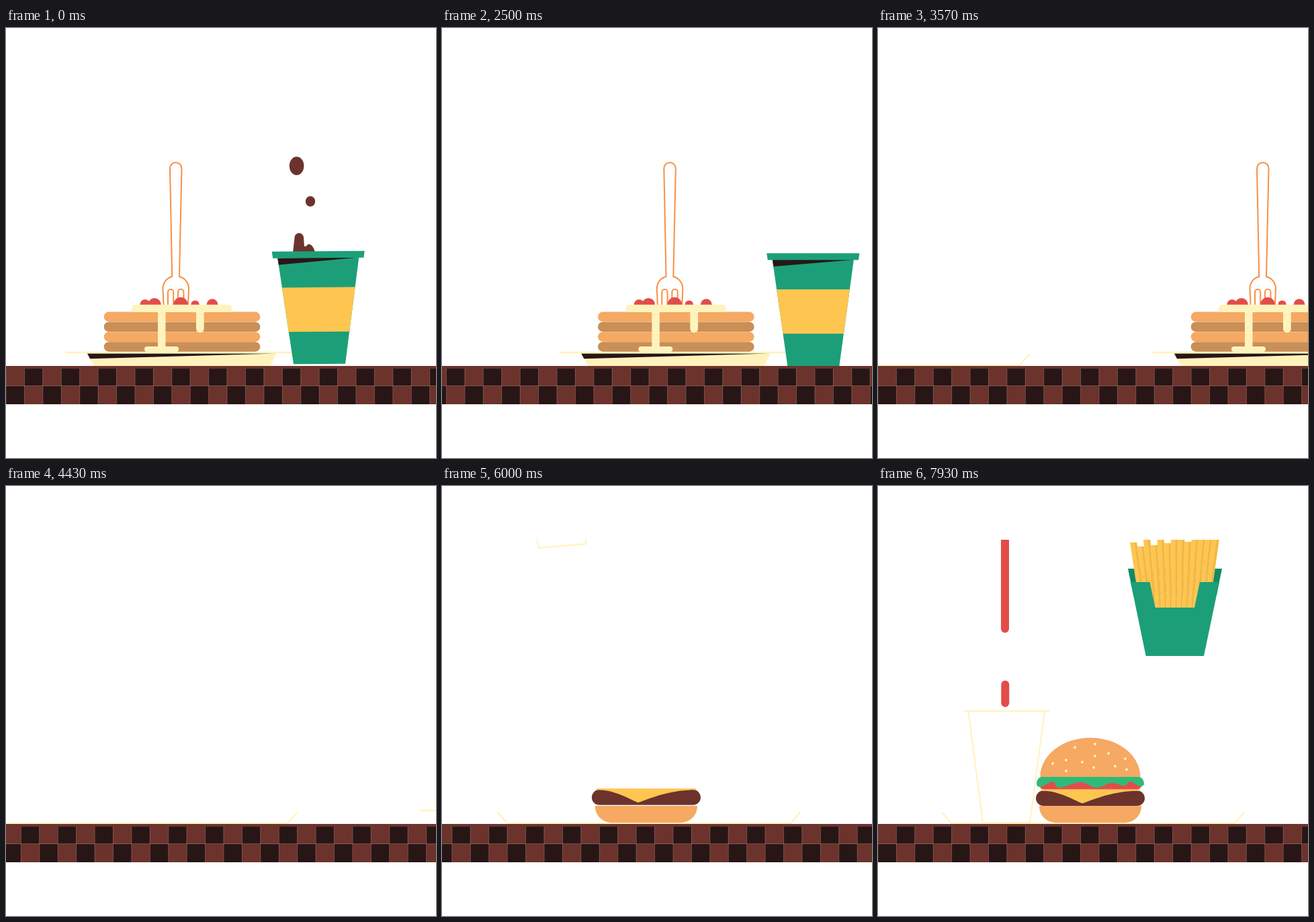
An HTML page with a canvas for the animation above (8 s loop, 640 by 640 pixels).

```html
<!DOCTYPE html>
<html lang="en">
<head>
<meta charset="utf-8">
<title>Breakfast belt</title>
<style>
  html, body { margin: 0; width: 100%; height: 100%; overflow: hidden; background: #fff; }
  canvas { display: block; width: 640px; height: 640px; }
</style>
</head>
<body>
<canvas id="stage" width="640" height="640"></canvas>
<script>
const ctx = document.getElementById('stage').getContext('2d');
const LOOP = 8000, FRAMES = 112;
const BROWN = '#6b332c', DARK = '#281617', CREAM = '#fff3bd', BUN = '#f5a962', CRUST = '#c98f57',
      RED = '#e34d48', GREEN = '#1c9f78', DEEP = '#0f8a68', LEAF = '#2fba79',
      YELLOW = '#fec651', AMBER = '#f0b748', ORANGE = '#f88f45';

const lerp = (a, b, k) => a + (b - a) * k;
const fill = (color, d) => { ctx.fillStyle = color; ctx.fill(new Path2D(d)); };
const line = (color, width, d) => {
  ctx.strokeStyle = color;
  ctx.lineWidth = width;
  ctx.stroke(new Path2D(d));
};
const rect = (color, x, y, w, h) => { ctx.fillStyle = color; ctx.fillRect(x, y, w, h); };
const pill = (color, x, y, w, h, r = h / 2) => {
  ctx.fillStyle = color;
  ctx.beginPath();
  ctx.roundRect(x, y, w, h, r);
  ctx.fill();
};
const oval = (color, x, y, rx, ry = rx) => {
  ctx.fillStyle = color;
  ctx.beginPath();
  ctx.ellipse(x, y, rx, ry, 0, 0, 7);
  ctx.fill();
};
function at(x, y, degrees, draw) {
  ctx.save();
  ctx.translate(x, y);
  ctx.rotate(degrees * Math.PI / 180);
  draw();
  ctx.restore();
}

// Cubic-bezier ease (.75, 0, .25, 1)
function ease(x) {
  if (x >= 1) return 1;
  let lo = 0, hi = 1;
  for (let i = 0; i < 30; i++) {
    const u = (lo + hi) / 2, v = 1 - u;
    if (2.25 * v * v * u + .75 * v * u * u + u ** 3 < x) lo = u; else hi = u;
  }
  return lo * lo * (3 - 2 * lo);
}

// Height above rest for something that lands at frame `land`
function drop(f, land) {
  const x = Math.min(1, Math.max(0, (f - land + 10) / 10));
  return 420 * (1 - x * x);
}
// 1 in the air, then a quick damped wobble to 0
function flex(f, land) {
  const t = f - land;
  return t < 0 ? 1 : Math.exp(-t / 1.2) * Math.cos(t * 1.5);
}

function belt(shift) {
  const cell = 27.42;
  rect(BROWN, 0, 503, 640, 57);
  const start = 27.6 + shift % (2 * cell) - 4 * cell;
  for (let x = start; x < 640; x += 2 * cell) {
    rect(DARK, x, 507, cell - .6, 25.4);
    rect(DARK, x + cell, 533, cell - .4, 27);
  }
  let grid = 'M0 532.5H640';
  for (let x = start; x < 640; x += cell) grid += `M${x - .1} 507V560`;
  line('rgba(255,235,225,.28)', .7, grid);
}

function pancakes() {
  line(ORANGE, 2, 'M234.5 412L233.5 388C233.5 379 239 372 247.2 370L244 209A8.7 8.7 0 0 1 261.5 209' +
    'L258 370C266 372 272 379 272 388L271 412M241 412V393a4.1 4.1 0 0 1 8.2 0V412M256 412V393a4.2 4.2 0 0 1 8.4 0V412');
  fill(CREAM, 'M121 484.5H402L394 503H131Z');
  fill(DARK, 'M121 484.5H402L125 492.3Z');
  line(CREAM, 2.4, 'M88 483H436');
  for (let i = 0; i < 4; i++) pill(i % 2 ? CRUST : BUN, 145.7, 422.6 + i * 14.85, 232.6, 14.6);
  for (const [x, r] of [[207, 7.5], [221, 9.7], [260, 10.8], [281.5, 6.2], [307, 8.4]]) oval(RED, x, 411.6, r);
  pill(CREAM, 187, 411.8, 149.5, 11.2);
  pill(CREAM, 226, 416, 11.5, 62, 0);
  pill(CREAM, 206, 474, 51, 8);
  pill(CREAM, 283, 416, 11.7, 37.5, [0, 0, 5.8, 5.8]);
}

function coffee(f) {
  const fallen = 18 * f + 5 * f * f;
  if (205 + fallen < 350) oval(BROWN, 432.6, 205.3 + fallen, 10.8, 13.8);
  if (258 + fallen < 350) oval(BROWN, 453, 258 + fallen, 7.2, 7.8);
  if (f < 3) at(0, 20 * f, 0, () => fill(BROWN,
    'M427 334L429.5 312C430 303 442.5 303 443 312L444 325C449 326 447 321 452 322C456 323 459 329 460 334Z'));
  const hop = Math.max(0, 1 - f / 4);
  at(466.5, 503 - 3 * hop, -.45 * hop, () => {
    ctx.translate(-466.5, -503);
    fill(GREEN, 'M405.5 345H526.5L505 503H428Z');
    fill(YELLOW, 'M411.8 389H520.6L511.5 455H421Z');
    fill(DARK, 'M405.5 345H526L407 355Z');
    fill(GREEN, 'M397 335.3H535L533.7 345.2H398.4Z');
  });
}

const leafFalling = [-74,-27, -43,-7, 3,0, 47,-6, 78,-17, 82,-11, 65,1, 66,15,
                     35,16, 20,31, 2,25, -28,17, -57,20, -60,2, -70,-9, -78,-22];
const leafResting = [-73,0, -41,0, 0,0, 44,0, 73,0, 80,10, 74,14, 59,7,
                     51,13, 32,9, 9,16, -14,8, -46,16, -56,7, -74,15, -80,10];

// Closed Catmull-Rom curve through a flat list of x, y pairs
function smooth(p) {
  const n = p.length, g = i => p[(i + n) % n];
  let d = `M${p[0]} ${p[1]}`;
  for (let i = 0; i < n; i += 2) {
    const c = [0, 1].map(a => g(i + a) + (g(i + 2 + a) - g(i - 2 + a)) / 6);
    const e = [0, 1].map(a => g(i + 2 + a) - (g(i + 4 + a) - g(i + a)) / 6);
    d += `C${c} ${e} ${g(i + 2)} ${g(i + 3)}`;
  }
  return d + 'Z';
}

const seeds = [[-23,-44], [7,-49], [-36,-25], [-56,-20], [-36,-9], [-12,-22],
               [7,-31], [27,-35], [5,-14], [37,-16], [52,-27], [54,-11]];

function burger(f) {
  const lift = f < 96 ? 1.3 : 0;
  const layer = (y, land, draw, tilt = 0) => {
    if (f < land - 10) return;
    const k = flex(f, land);
    at(316, y - drop(f, land), tilt * k, () => draw(k));
  };
  layer(476, 75.4, k => fill(BUN,
    `M-76 0Q0 ${11 * k} 76 0C76 15 65 25.3 49 25.3Q0 ${25.3 + 11 * k} -49 25.3C-65 25.3 -76 15 -76 0Z`));
  layer(464.7 - lift, 78.95, k => {
    ctx.lineCap = 'round';
    line(BROWN, 22.6, `M-69.7 0Q0 ${16 * k} 69.7 0`);
    ctx.lineCap = 'butt';
  });
  layer(451.5 - lift, 84, () => fill(YELLOW,
    'M-74 0H74V2C40 2 15 11 -12 21C-30 13 -48 2 -74 2Z'));
  layer(437.6, 92.2, () => pill(RED, -76, 0, 152.5, 14, 6.8));
  layer(433, 93.6, k => fill(LEAF, smooth(leafResting.map((v, i) => lerp(v, leafFalling[i], k)))));
  layer(433, 96.5, k => {
    fill(BUN, `M-74.5 0C-74.5 -32 -42 -58.3 0 -58.3C42 -58.3 74.5 -32 74.5 0Q0 ${13 * k} -74.5 0Z`);
    for (const [x, y] of seeds) oval(CREAM, x, y, 1.9);
  }, -5.2);
}

function softDrink(f) {
  const land = 92.6, t = Math.max(0, f - land);
  if (f < land - 10) return;
  const tilt = -4.7 * Math.exp(-t / 14) * Math.cos(t * Math.PI * 2 / 14.7);
  at(191, 501 - drop(f, land), tilt, () =>
    line(CREAM, 2, 'M-64 -166H64M-56.5 -166L-35 0H35L57 -166'));
}

function pour(f) {
  const y = (f - 111) * 55;
  ctx.lineCap = 'round';
  line(RED, 12, `M189 ${y - 100}V${212.5 + y}M189.3 ${295.5 + y}V${323 + y}`);
  ctx.lineCap = 'butt';
}

function fries(f) {
  const land = 114.6;
  if (f < land - 10) return;
  at(0, 250 - drop(f, land), 0, () => {
    fill(DEEP, 'M372 121H512L504 160H380Z');
    const tops = { 0: 82, 1: 88, 3: 86, 5: 83, 8: 81 };
    for (let i = 0; i < 13; i++) {
      const top = tops[i] || 70 + i % 3 * 3;
      const edge = (k, y) => `${lerp(374.7 + k * 10.2, 389.8 + k * 7.95, (y - 80) / 99)} ${y}`;
      const stick = (color, a, b) =>
        fill(color, `M${edge(a, top)}L${edge(b, top)}L${edge(b, 180)}L${edge(a, 180)}Z`);
      stick(YELLOW, i, i + 1.03);
      stick(AMBER, i + .66, i + .95);
    }
    fill(GREEN, 'M376 141H404.6L412.6 179H471L479 141H508L485 251H398.7Z');
  });
}

function draw(f) {
  ctx.clearRect(0, 0, 640, 640);
  ctx.save();
  ctx.beginPath();
  ctx.rect(0, 80, 640, 480);
  ctx.clip();
  const travel = ease(f / 100);
  belt(travel * 658);
  at(travel * 640, 0, 0, () => { pancakes(); coffee(f); });
  at(travel * 640 - 640, 0, 0, () => {
    line(CREAM, 2, 'M95 485.5L109 502H531L545 485.5');
    pour(f);
    softDrink(f);
    fries(f);
    burger(f);
  });
  ctx.restore();
}

function tick() {
  const t = performance.now() % LOOP;
  draw(Math.min(FRAMES - 1, Math.floor(t * FRAMES / LOOP + .1)));
  requestAnimationFrame(tick);
}
tick();
</script>
</body>
</html>
```
